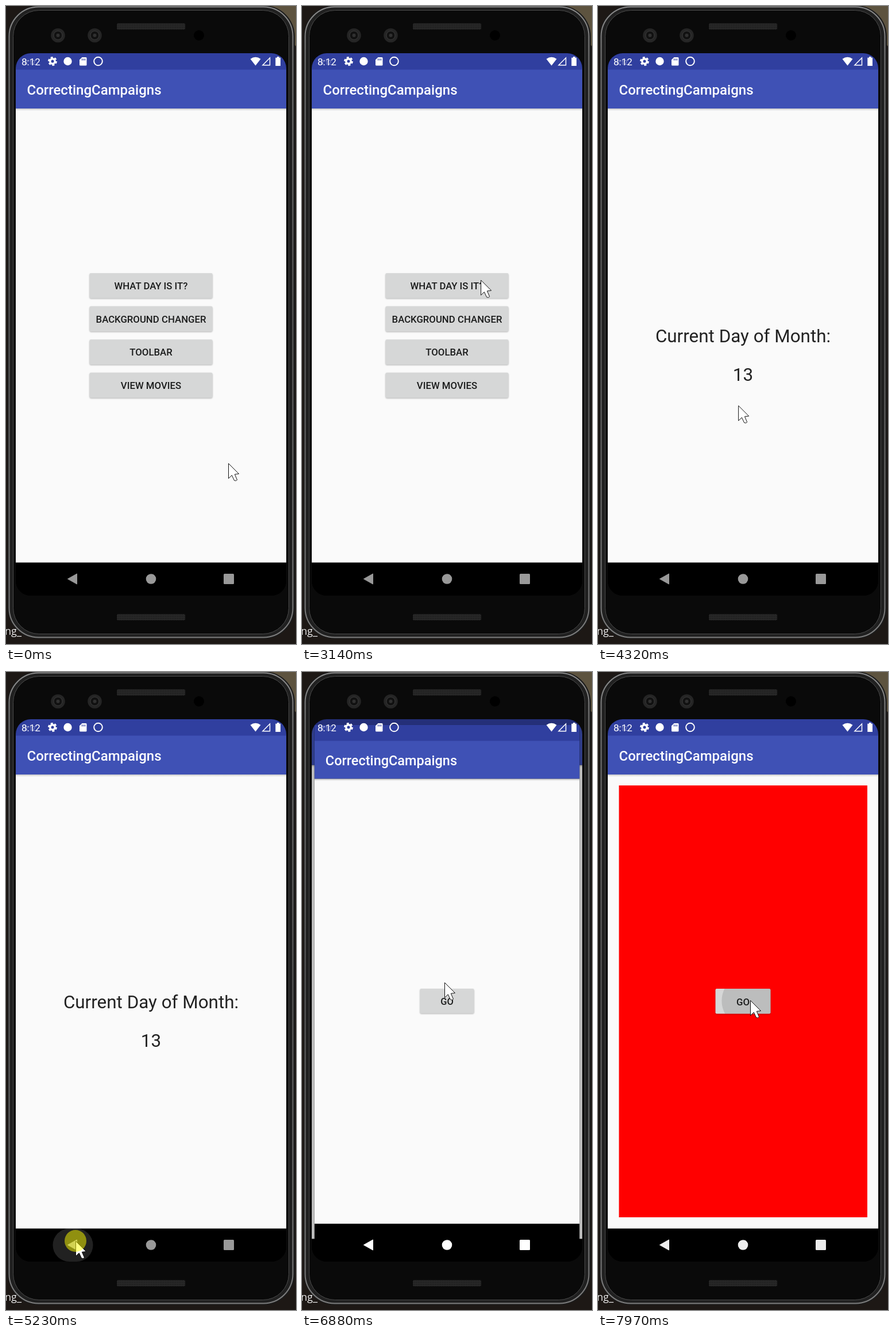
An HTML page for the animation above (8000 ms loop, 505x1108 px).

```html
<!DOCTYPE html>
<html lang="en">
<head>
<meta charset="utf-8">
<title>Phone demo</title>
<style>
  html, body { margin: 0; width: 100%; height: 100%; overflow: hidden; background: #1d1815; }
  svg { display: block; width: 505px; height: 1108px; font-family: Roboto, Arial, sans-serif; }
  .window { transform-origin: 252.5px 553px; }
  .button { fill: #d6d7d7; filter: drop-shadow(0 1.5px 1px rgba(0, 0, 0, .28)); }
  .label { font-size: 16.8px; font-weight: 500; text-anchor: middle; fill: #1b1c1c; }
  .day { font-size: 31.4px; text-anchor: middle; fill: #222; }
  .title { font-size: 24px; font-weight: 500; fill: #fff; }
  .ripple { fill: #000; }
</style>
</head>
<body>
<svg viewBox="0 0 505 1108">
  <defs>
    <clipPath id="glass"><rect x="17" y="82" width="471" height="942" rx="26"/></clipPath>
    <clipPath id="dayButton"><rect x="145.5" y="464" width="214" height="43.6" rx="2.4"/></clipPath>
    <clipPath id="colorButton"><rect x="145.5" y="521.6" width="214" height="43.6" rx="2.4"/></clipPath>
    <clipPath id="goButton"><rect x="204.5" y="550" width="96" height="43.6" rx="2.4"/></clipPath>
    <pattern id="mesh" width="3" height="3" patternUnits="userSpaceOnUse">
      <rect width="3" height="3" fill="#292929"/><circle cx="1.5" cy="1.5" r=".8" fill="#111"/>
    </pattern>
    <linearGradient id="shade" x2="0" y2="1">
      <stop stop-color="#000" stop-opacity=".2"/><stop offset="1" stop-color="#000" stop-opacity="0"/>
    </linearGradient>
    <linearGradient id="rim" x2="0" y2="1">
      <stop stop-color="#8b8b8b"/><stop offset=".08" stop-color="#777"/>
      <stop offset=".5" stop-color="#5c5c5c"/><stop offset="1" stop-color="#7d7d7d"/>
    </linearGradient>
    <g id="frame">
      <rect x="17" y="82" width="471" height="942"/>
      <rect x="17" y="82" width="471" height="29" fill="#303f9f"/>
      <rect x="17" y="110.5" width="471" height="67.5" fill="#3f51b5"/>
      <rect x="17" y="178" width="471" height="788.5" fill="#fafafa"/>
      <rect x="17" y="178" width="471" height="4" fill="url(#shade)"/>
      <text class="title" x="36.5" y="154">CorrectingCampaigns</text>
    </g>
  </defs>

  <rect width="505" height="1108" fill="#1d1815"/>
  <path d="M440 0H505V70Z" fill="#5d533f"/>
  <text x="-2" y="1092" font-size="18" fill="#eee" style="font-family: 'Open Sans', sans-serif">ng_</text>

  <rect x="3" y="-1" width="500" height="1100" rx="54" fill="#1c1c1c"/>
  <rect x="5.5" y="1.5" width="494" height="1095" rx="51" fill="#202020" stroke="url(#rim)" stroke-width="2"/>
  <rect x="12.5" y="7.5" width="480" height="1083" rx="45" fill="#0a0a0a" stroke="#4c4c4c"/>
  <rect x="193" y="30" width="119" height="11" rx="2" fill="url(#mesh)"/>
  <rect x="193" y="1056" width="119" height="11" rx="2" fill="url(#mesh)"/>
  <g id="lens">
    <circle cx="90.5" cy="51" r="12.3" fill="#252525"/>
    <circle cx="90.5" cy="51" r="7.5" fill="#111" stroke="#3b3b3b"/>
    <circle cx="90.5" cy="51" r="3" fill="#303030"/>
  </g>
  <use href="#lens" x="64"/>
  <circle cx="336" cy="51" r="9"/>

  <g clip-path="url(#glass)">
    <rect x="17" y="82" width="471" height="942"/>
    <g class="window" id="main">
      <use href="#frame"/>
      <g id="menu"></g>
      <g clip-path="url(#dayButton)"><circle class="ripple" id="dayRipple" cx="325" cy="493"/></g>
      <g clip-path="url(#colorButton)"><circle class="ripple" id="colorRipple" cx="248" cy="539"/></g>
    </g>
    <g class="window" id="color">
      <use href="#frame"/>
      <rect id="red" x="36.5" y="197" width="432.5" height="750" fill="#f00"/>
      <rect class="button" x="204.5" y="550" width="96" height="43.6" rx="2.4"/>
      <g clip-path="url(#goButton)"><circle class="ripple" id="goRipple" cx="262" cy="571"/></g>
      <text class="label" x="252.5" y="578.5">GO</text>
    </g>
    <g class="window" id="day">
      <use href="#frame"/>
      <text class="day" x="252.5" y="584">Current Day of Month:</text>
      <text class="day" x="252.5" y="651">13</text>
    </g>

    <g fill="#fff">
      <text x="27" y="103" font-size="17">8:12</text>
      <text x="32" y="102" font-size="10" opacity=".45">8:12</text>
      <circle cx="81" cy="96" r="4.2" fill="none" stroke="#fff" stroke-width="3.4"/>
      <circle cx="81" cy="96" r="6.6" fill="none" stroke="#fff" stroke-width="2.6" stroke-dasharray="3.9 3.01"/>
      <circle cx="107.5" cy="96" r="7.2"/>
      <path d="M132.500 89H139a1.500 1.500 0 0 1 1.500 1.500V102a1.500 1.500 0 0 1-1.500 1.500H129.500a1.500 1.500 0 0 1-1.500-1.500V93.500Z"/>
      <path d="M132.500 91.500v3M135 91.500v3M137.500 91.500v3" stroke="#303f9f" stroke-width="1.200"/>
      <circle cx="160.500" cy="96" r="7.300" fill="none" stroke="#fff" stroke-width="2"/>
      <path d="M425.500 92Q434.500 85.500 443.500 92L434.500 103.500Z"/>
      <path d="M459.500 90V102.700H447Z" fill="none" stroke="#fff" stroke-width="1.500"/>
      <path d="M472 88h3.500v1.700H478V104H469.300V89.700H472Z"/>
    </g>

    <rect id="backRipple" x="81.500" y="966.500" width="70" height="57.500" rx="28.700" fill="#fff"/>
    <g id="nav" fill="#fff" stroke-linejoin="round">
      <path d="M107.500 995L123.500 986V1004Z" stroke="#fff"/>
      <circle cx="252.500" cy="995" r="8.800"/>
      <rect x="379" y="986" width="18" height="18" rx="1.500"/>
    </g>
  </g>

  <g id="cursor">
    <path d="M.5.5V26.500L6.300 21 10.500 30 13.500 30.500 15.500 29 11.300 19.300 18.500 18.500Z" fill="#fff" stroke="#111"/>
    <circle id="press" r="19" fill="#ff0" fill-opacity=".5"/>
  </g>
</svg>
<script>
const $ = id => document.getElementById(id);
const clamp = v => Math.min(1, Math.max(0, v));
const ramp = (t, a, b) => clamp((t - a) / (b - a));
const mix = (a, b, p) => a + (b - a) * p;

$('menu').innerHTML = ['WHAT DAY IS IT?', 'BACKGROUND CHANGER', 'TOOLBAR', 'VIEW MOVIES'].map((s, i) => `
  <rect class="button" x="145.5" y="${464 + 57.6 * i}" width="214" height="43.6" rx="2.4"/>
  <text class="label" x="252.5" y="${492 + 57.6 * i}">${s}</text>`).join('');

// Pointer stops: time, x, y
const path = [
  [0, 387, 794], [10, 387, 794], [560, 318, 422], [860, 305, 538], [900, 305, 538],
  [1060, 301, 498], [1200, 301, 498], [1260, 303, 496], [1600, 309, 473], [3100, 309, 473],
  [3280, 325, 493], [3980, 325, 493], [4760, 126, 987], [4810, 126, 987], [4920, 121, 988],
  [5420, 121, 988], [5950, 248, 539], [7380, 248, 539], [7700, 265, 570], [8000, 265, 570]
];
const presses = [[1950, 2070], [3400, 3660], [5150, 5290], [6270, 6400], [7770, 7890]];

function pointer(t) {
  const i = path.findIndex(k => k[0] > t);
  const [a, b] = [path[i - 1], path[i]];
  const p = ramp(t, a[0], b[0]), s = p * p * (3 - 2 * p);
  return [mix(a[1], b[1], s), mix(a[2], b[2], s)];
}

// Fast start, very slow finish: two joined cubic curves
const cubic = ([a, b, c, d], u) => {
  const v = 1 - u;
  return a * v * v * v + 3 * b * u * v * v + 3 * c * u * u * v + d * u * u * u;
};
function settle(p) {
  const [xs, ys] = p < 1 / 6
    ? [[0, .05, .1333, 1 / 6], [0, 0, .06, .4]]
    : [[1 / 6, .2083, .25, 1], [.4, .82, 1, 1]];
  let lo = 0, hi = 1;
  for (let i = 0; i < 24; i++) {
    const mid = (lo + hi) / 2;
    if (cubic(xs, mid) < p) lo = mid; else hi = mid;
  }
  return cubic(ys, lo);
}

function place(id, scale, alpha) {
  const s = $(id).style;
  s.display = alpha > 0 ? '' : 'none';
  s.opacity = alpha;
  s.transform = `scale(${scale})`;
}

const SLIDE = 400;
function open(from, to, time) {
  const p = time / SLIDE, e = settle(p);
  place(from, mix(1, 1.05, e), 1 - .73 * p);
  place(to, mix(.85, 1, e), ramp(time, 20, 70));
}
function close(from, to, time) {
  const e = settle(time / SLIDE);
  place(to, mix(1.1, 1, e), 1);
  place(from, mix(1, .9, e), 1 - ramp(time, 35, 85));
}

function windows(t) {
  for (const id of ['main', 'day', 'color']) place(id, 1, 0);
  if (t < 3460) place('main', 1, 1);
  else if (t < 3460 + SLIDE) open('main', 'day', t - 3460);
  else if (t < 5480) place('day', 1, 1);
  else if (t < 5480 + SLIDE) close('day', 'main', t - 5480);
  else if (t < 6750) place('main', 1, 1);
  else if (t < 6750 + SLIDE) open('main', 'color', t - 6750);
  else place('color', 1, 1);
}

function ripple(id, t, start, end, radius) {
  $(id).setAttribute('r', radius * ramp(t, start, start + 140));
  $(id).setAttribute('opacity', t < start ? 0 : .12 * (1 - ramp(t, end - 150, end)));
}

function draw(t) {
  windows(t);
  ripple('dayRipple', t, 3330, 3700, 185);
  ripple('colorRipple', t, 6330, 6610, 114);
  ripple('goRipple', t, 7848, 8300, 53);
  $('red').style.display = t >= 7950 ? '' : 'none';
  $('backRipple').setAttribute('opacity', .13 * ramp(t, 5090, 5200) * (1 - ramp(t, 5400, 5600)));
  $('nav').setAttribute('opacity', .6 + .4 * ramp(t, 5230, 5500) - .4 * ramp(t, 7910, 8260));
  $('cursor').setAttribute('transform', `translate(${pointer(t)})`);
  $('press').style.display = presses.some(([a, b]) => t >= a && t < b) ? '' : 'none';
}

const begin = performance.now();
function tick() {
  draw((performance.now() - begin) % 8000);
  requestAnimationFrame(tick);
}
tick();
</script>
</body>
</html>
```
